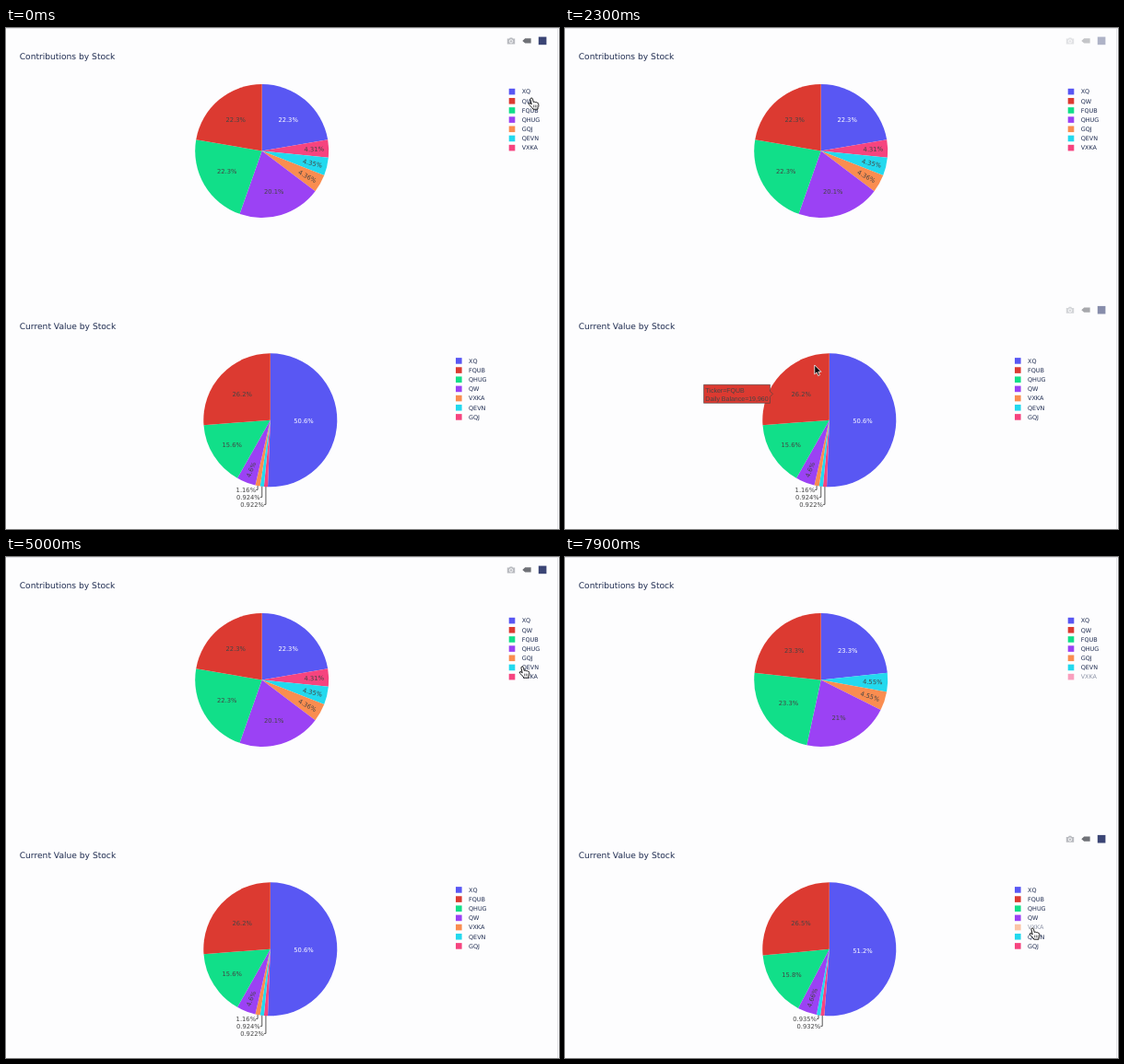
Animation of 600x544 px, one loop 8000 ms. Source, as an HTML page:

```html
<!DOCTYPE html>
<html lang="en">
<head>
<meta charset="utf-8">
<title>Stock charts</title>
<style>
html, body { margin: 0; width: 100%; height: 100%; overflow: hidden; background: #fdfdfe; }
svg { display: block; width: 600px; height: 544px; }
text { font-family: "DejaVu Sans", Verdana, sans-serif; text-rendering: geometricPrecision; }
.tip text { font-family: "Liberation Sans", Arial, sans-serif; }
</style>
</head>
<body>
<svg id="stage" viewBox="0 0 600 544"></svg>
<script>
(() => {
const LOOP = 8000, R = 72.5, TURN = 2 * Math.PI, INK = '#1f2c50', DARK = '#444';
const COLORS = ['#5957f3', '#dc3a31', '#11df89', '#9b42f4', '#fa8d50', '#23d9ee', '#f6447f'];
const stage = document.getElementById('stage');

const upper = {
  title: 'Contributions by Stock', y: 133.5, x: 277.7, legendX: 545.7, hides: 6, hideAt: 5400,
  names: ['XQ', 'QW', 'FQUB', 'QHUG', 'GQJ', 'QEVN', 'VXKA'],
  values: [22.3, 22.3, 22.3, 20.1, 4.357, 4.35, 4.31]
};
const lower = {
  title: 'Current Value by Stock', y: 425.8, x: 286.8, legendX: 488, hides: 4, hideAt: 6980,
  names: ['XQ', 'FQUB', 'QHUG', 'QW', 'VXKA', 'QEVN', 'GQJ'],
  values: [38574, 19960, 11890, 3507.3, 884, 704.2, 702.5]
};

function add(parent, tag, attrs = {}, content) {
  const el = document.createElementNS(stage.namespaceURI, tag);
  for (const k in attrs) el.setAttribute(k, attrs[k]);
  if (content !== undefined) el.textContent = content;
  return parent.appendChild(el);
}
const group = attrs => add(stage, 'g', attrs);
const show = (el, on) => el.setAttribute('visibility', on ? 'visible' : 'hidden');
const clamp = v => Math.max(0, Math.min(1, v));

// y is the middle of the capitals
function label(parent, str, x, y, size, fill, anchor = 'start', turn = 0) {
  return add(parent, 'text', {
    x, y: y + size * 0.364, fill, 'font-size': size, 'text-anchor': anchor,
    transform: `rotate(${turn} ${x} ${y})`
  }, str);
}

const polar = (pie, part, r) =>
  [pie.x + r * Math.sin(part * TURN), pie.y - r * Math.cos(part * TURN)];

// Radius, in parts of R, of the circle that fits inside a slice
const inscribed = size => size >= 0.5 ? 0.5 : 1 / (1 + 1 / Math.sin(size * Math.PI));

// Distance from the centre for text that runs along the radius
function radialReach(size, chars) {
  const aspect = chars * 0.52;
  const q = aspect + 0.5 / Math.tan(size * Math.PI);
  const half = 1 / (Math.sqrt(q * q + 0.5) + q);
  return Math.cos(2 * half) - half * aspect;
}

// The first slice leads clockwise from the top, the others follow from last to second
function layout(values, hidden) {
  const order = values.map((_, i) => (values.length - i) % values.length).filter(i => i !== hidden);
  const total = order.reduce((sum, i) => sum + values[i], 0);
  let from = 0;
  return order.map(i => {
    const size = values[i] / total, s = { i, size, from, to: from + size, mid: from + size / 2 };
    from = s.to;
    return s;
  });
}

function drawPie(pie, slices) {
  const g = group();
  for (const s of slices) {
    const [x0, y0] = polar(pie, s.from, R), [x1, y1] = polar(pie, s.to, R);
    add(g, 'path', {
      d: `M${pie.x} ${pie.y}L${x0} ${y0}A${R} ${R} 0 ${s.size > 0.5 ? 1 : 0} 1 ${x1} ${y1}Z`,
      fill: COLORS[s.i]
    });
  }
  const text = s => Number((s.size * 100).toPrecision(3)) + '%';
  for (const s of slices.filter(s => s.size > 0.02)) {
    const radial = s.size < 0.1;
    const reach = radial ? radialReach(s.size, text(s).length) : 1 - inscribed(s.size);
    const [x, y] = polar(pie, s.mid, R * reach);
    const turn = radial ? s.mid * 360 - (s.mid < 0.5 ? 90 : 270) : 0;
    label(g, text(s), x, y, 6.75, s.i ? DARK : '#fff', 'middle', turn);
  }
  // Thin slices get stacked labels below, each with a bent leader line
  slices.filter(s => s.size <= 0.02).reverse().forEach((s, row) => {
    const [x, top] = polar(pie, s.mid, R);
    const y = pie.y + 75.6 + row * 8;
    label(g, text(s), x - 2, y, 6.75, DARK, 'end');
    add(g, 'path', { d: `M${x} ${top}V${y}h-1.8`, fill: 'none', stroke: DARK, 'stroke-width': 0.9 });
  });
  return g;
}

function drawTools(y) {
  const g = group({ transform: `translate(0 ${y})` });
  add(g, 'path', { d: 'M543.8-2.4H546L546.8-3.6H549.2L550-2.4H552.2V3.4H543.8Z', fill: '#b9bbc0' });
  add(g, 'circle', { cx: 548, cy: 0.4, r: 1.7, fill: 'none', stroke: '#fdfdfe', 'stroke-width': 0.9 });
  add(g, 'path', { d: 'M560.3-.1L563.2-2.7H569.6V2.5H563.2Z', fill: '#6f7177' });
  add(g, 'rect', { x: 577.8, y: -4.4, width: 8.6, height: 8.6, fill: '#3b4575' });
  return g;
}

function drawChart(c) {
  label(stage, c.title, 14.7, c.y - 102.6, 9.15, INK);
  c.slices = layout(c.values);
  c.full = drawPie(c, c.slices);
  c.reduced = drawPie(c, layout(c.values, c.hides));
  c.items = c.names.map((name, i) => {
    const g = group(), y = c.y - 64.4 + i * 10.17;
    add(g, 'rect', { x: c.legendX, y: y - 3.3, width: 6.6, height: 6.6, fill: COLORS[i] });
    label(g, name, c.legendX + 14, y, 6.45, INK);
    return g;
  });
  c.tools = drawTools(c.y - 119.5);
}

add(stage, 'rect', { width: 600, height: 544, fill: '#fdfdfe' });
add(stage, 'path', { d: 'M0 .5H600M598.5 0V544', stroke: '#e3e3e7' });
[upper, lower].forEach(drawChart);

const tip = group({ class: 'tip' });
const tipBox = add(tip, 'path', { stroke: DARK, 'stroke-width': 0.6 });
const tipText = [0, 1].map(() => label(tip, '', 0, 0, 7, DARK));

const arrow = group(), hand = group();
add(arrow, 'path', {
  d: 'M0 0V10L2.3 7.9L4 11.6L5.7 10.8L4.1 7.3H7.2Z',
  fill: '#0b0b0d', stroke: '#fff', 'stroke-width': 0.8
});
add(hand, 'path', {
  d: 'M-1.1 1.2Q-1 0 .2 0Q1.2 0 1.5 1.1L2.2 4.4Q3.4 3.7 4.2 4.7Q5.4 4.1 6.1 5.1Q7.5 4.9 7.7 6.4L7.9 8.6Q7.8 9.8 7 10.6V12.2H1.8L1.2 10.8L-2.6 7.1Q-3.3 5.7-2 5.5Q-1.1 5.5 .2 6.9Z',
  fill: '#fff', stroke: '#111', 'stroke-width': 0.95, 'stroke-linejoin': 'round'
});
add(hand, 'path', { d: 'M2.6 7.6V10.4M4.3 7.6V10.4M6 7.6V10.4', stroke: '#111', 'stroke-width': 0.6 });

// Pointer legs: start, end, control point, target
const LEGS = [
  [100, 800, 420, 500, 276, 500],
  [900, 1700, 268, 380, 278, 206],
  [1850, 2750, 262, 380, 281, 496],
  [3050, 3900, 275, 496, 270, 494],
  [4050, 4750, 470, 560, 560, 119],
  [5050, 5200, 561, 123, 561, 127],
  [5600, 6250, 560, 290, 507, 403]
];
const ease = u => u * u * (3 - 2 * u);

function pointer(t) {
  let x = 570, y = 76;
  for (const [a, b, cx, cy, ex, ey] of LEGS) {
    const u = ease(clamp((t - a) / (b - a))), v = 1 - u;
    x = v * v * x + 2 * u * v * cx + u * u * ex;
    y = v * v * y + 2 * u * v * cy + u * u * ey;
  }
  return [x, y];
}

const overLegend = (c, x, y) =>
  x > c.legendX - 3 && x < c.legendX + 40 && Math.abs(y - c.y + 34) < 36;

function drawTip(px, py) {
  const dx = px - lower.x, dy = py - lower.y;
  const part = (Math.atan2(dx, -dy) / TURN + 1) % 1;
  const s = Math.hypot(dx, dy) < R && lower.slices.find(s => part >= s.from && part < s.to);
  show(tip, !!s);
  if (!s) return;
  const inner = inscribed(s.size), side = s.mid > 0.5 ? -1 : 1;
  const [mx, my] = polar(lower, s.mid, R * (1 - inner));
  const ax = mx + side * inner * R;
  tipText[0].textContent = 'Ticker=' + lower.names[s.i];
  tipText[1].textContent = 'Daily Balance=' + lower.values[s.i].toLocaleString('en-US');
  const w = Math.max(...tipText.map(e => e.getComputedTextLength())) + 3.6;
  tipBox.setAttribute('d', `M${ax} ${my}l${side * 3} -3v-7h${side * w}v20h${-side * w}v-7Z`);
  tipBox.setAttribute('fill', COLORS[s.i]);
  const left = side < 0 ? ax - 3 - w : ax + 3;
  tipText.forEach((e, i) => {
    e.setAttribute('x', left + 1.8);
    e.setAttribute('y', my - 1.7 + i * 9.1);
  });
}

// The toolbar changes chart with the pointer, with a short fade
const SWAPS = [400, 1380, 2150, 4470, 5930];
const lowerTools = t =>
  SWAPS.reduce((v, at, i) => v + (i % 2 ? -1 : 1) * clamp((t - at) / 250), 0);

function draw(t) {
  for (const c of [upper, lower]) {
    const off = t >= c.hideAt;
    show(c.full, !off);
    show(c.reduced, off);
    c.items[c.hides].setAttribute('opacity', off ? 0.5 : 1);
  }
  const k = lowerTools(t);
  upper.tools.setAttribute('opacity', 1 - k);
  lower.tools.setAttribute('opacity', k);
  const [x, y] = pointer(t);
  drawTip(x, y);
  const onLegend = overLegend(upper, x, y) || overLegend(lower, x, y);
  show(hand, onLegend);
  show(arrow, !onLegend);
  (onLegend ? hand : arrow).setAttribute('transform', `translate(${x} ${y})`);
}

const begin = performance.now();
function tick(now) {
  draw(Math.max(0, now - begin) % LOOP);
  requestAnimationFrame(tick);
}
draw(0);
requestAnimationFrame(tick);
})();
</script>
</body>
</html>
```
